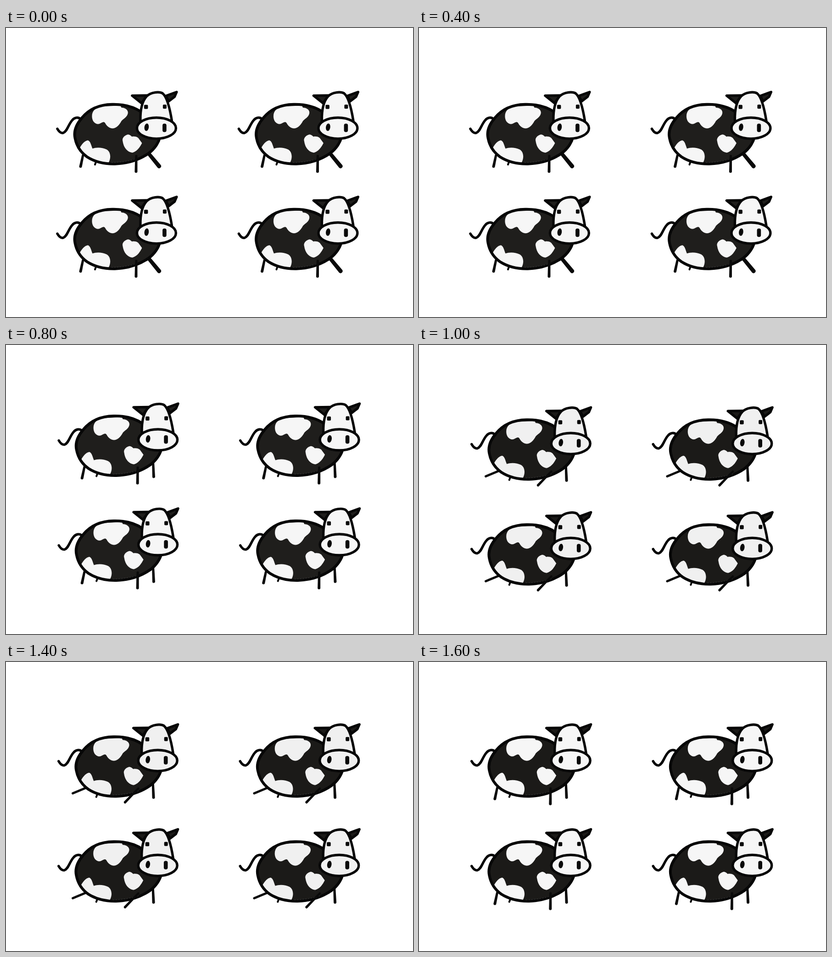
Recreate the animation shown at these times as an HTML page. Size 887 by 631 pixels, loop 1800 ms.

```html
<!DOCTYPE html>
<html lang="en">
<head>
<meta charset="utf-8">
<title>Dancing cows</title>
<style>
  html, body { margin: 0; width: 100%; height: 100%; overflow: hidden; background: #fff; }
  svg { display: block; width: 887px; height: 631px; --light: #f6f6f6; --dark: #1f1e1c; }
  .line { fill: none; stroke: #060606; stroke-width: 5.4; stroke-linecap: round; stroke-linejoin: round; }
  .thin { stroke-width: 4; }
  .thick { stroke-width: 6; }
  .dark { fill: var(--dark); }
  .light { fill: var(--light); }
  .ink { fill: #0a0a0a; }
</style>
</head>
<body>
<svg viewBox="0 0 887 631" xmlns="http://www.w3.org/2000/svg">
  <defs>
    <path id="body" d="M296 183.500C278 171 255 166 232 166.500C198 167 179 180 166 196C153 211 148 226 151 240C154 256 163 271 177 281C194 292 214 297 238 296.500C268 295.500 292 287 312 273C325 263 333 250 335.500 240"/>
    <g id="cow">
      <path class="line" d="M112.500 220C116 226 120 230 125 229C134 226 136 211 145 201C150 195 158 194 162 198"/>
      <path class="line thin" d="M196 294L194.500 298"/>
      <path id="rear" class="ink"/>
      <path id="far" class="ink"/>
      <use href="#body" class="dark"/>
      <path class="light" d="M188 192C188 180 197 173 210 171L250 169L252 173.500C262 174 268 180 266 187C264 195 256 198 252 203C249 209 242 219 233 219C227 219 222 215 219 211C217 208 216 205 213 205C208 206 204 211 198 209C191 206 188 200 188 192Z"/>
      <path class="light" d="M255 247C253 241 258 235 264 233C268 231 272 234 275 237C280 236 286 237 289 240L297 251C293 259 287 269 276 272C266 271 257 262 255 247Z"/>
      <path class="light" d="M161 262C166 253 172 246 179 245C185 247 186 256 189 263C197 260 210 260 220 265C229 270 230 284 224 294C205 294 185 286 175 279C169 273 165 268 161 262Z"/>
      <use href="#body" class="line thick"/>
      <path d="M230 293.500C252 293 272 290 288 284" fill="none" stroke="#555" stroke-width=".6" stroke-dasharray="4 2"/>
      <path id="near" class="ink"/>
      <path class="line dark" d="M275.500 147.500L308 147L296 164Z"/>
      <path class="line dark" d="M349 148L372.500 139.500L368 150L355 160Z"/>
      <path class="line light" d="M293.500 202C293 179 297 160 307 149C316 140 334 138 342 142.500C351 150 357.500 174 362 202"/>
      <ellipse class="line light" cx="328.500" cy="218.500" rx="42.500" ry="23"/>
      <rect class="ink" x="301.500" y="167.500" width="8.500" height="9" rx="2"/>
      <rect class="ink" x="342.500" y="167" width="8" height="9" rx="2"/>
      <ellipse class="ink" cx="307" cy="216.500" rx="4.800" ry="8.200" transform="rotate(8 307 216.500)"/>
      <rect class="ink" x="341.700" y="208.500" width="8.600" height="18.500" rx="4"/>
    </g>
  </defs>
  <g id="herd">
    <use href="#cow"/>
    <use href="#cow" x="395.500"/>
    <use href="#cow" y="229"/>
    <use href="#cow" x="395.500" y="229"/>
  </g>
</svg>
<script>
const STEP = 200;
const $ = id => document.getElementById(id);
const svg = document.querySelector("svg");

// Leg: x1, y1, x2, y2, width at the top, width near the foot
const LEGS = {
  rear: { down: [168.5, 277, 162.5, 305, 5, 6], kick: [172, 278, 141, 291, 5, 5] },
  near: { down: [284.5, 278, 284, 316, 5, 6], kick: [287, 278.5, 255.5, 311.5, 4.5, 5.5] },
  far: { down: [318, 268, 319.5, 302, 5, 6], kick: [310, 272, 337, 305, 8, 9] }
};

const REST = { x: -0.6, y: 0.2, dark: "#1f1e1c", light: "#f6f6f6" };
const KICK = { ...REST, far: "kick" };
const JUMP = { ...REST, x: 2.6, y: -11.5 };
const LAND = { ...REST, x: 2.2, y: -3.3, dark: "#1b1a18" };
const SPLIT = { ...LAND, rear: "kick", near: "kick", light: "#f0f0f0" };
const DANCE = [KICK, REST, KICK, REST, JUMP, SPLIT, LAND, SPLIT, LAND];

function legPath([x1, y1, x2, y2, top, foot]) {
  const len = Math.hypot(x2 - x1, y2 - y1);
  const ux = (x2 - x1) / len, uy = (y2 - y1) / len;
  const at = (along, side) =>
    `${x1 + ux * along - uy * side} ${y1 + uy * along + ux * side}`;
  const end = len - foot / 2, a = top / 2, b = foot / 2;
  return `M${at(0, a)}L${at(end, b)}Q${at(len, b)} ${at(len, 0)}` +
    `Q${at(len, -b)} ${at(end, -b)}L${at(0, -a)}Q${at(-a, 0)} ${at(0, a)}Z`;
}

function draw(ms) {
  const pose = DANCE[Math.floor(ms / STEP) % DANCE.length];
  for (const name in LEGS)
    $(name).setAttribute("d", legPath(LEGS[name][pose[name] || "down"]));
  $("herd").setAttribute("transform", `translate(${pose.x} ${pose.y})`);
  svg.style.setProperty("--dark", pose.dark);
  svg.style.setProperty("--light", pose.light);
}

const start = performance.now();
function tick() {
  draw(performance.now() - start);
  requestAnimationFrame(tick);
}
draw(0);
requestAnimationFrame(tick);
</script>
</body>
</html>
```
